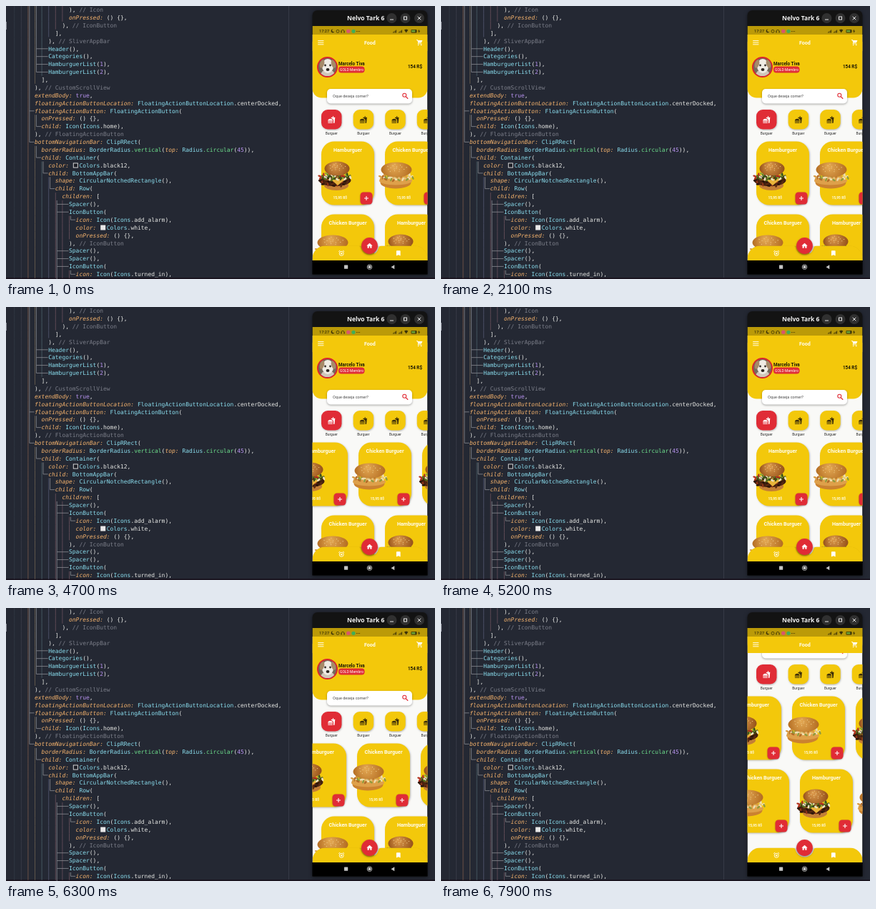
Recreate the animation shown at these times as an HTML page with a canvas. Size 600 by 382 pixels, loop 8000 ms.

```html
<!DOCTYPE html>
<html lang="en">
<head>
<meta charset="utf-8">
<title>Food app preview</title>
<style>
html, body { margin: 0; width: 100%; height: 100%; overflow: hidden; background: #242833; }
canvas { display: block; }
</style>
</head>
<body>
<canvas id="stage" width="600" height="382"></canvas>
<script>
const canvas = document.getElementById('stage');
let g = canvas.getContext('2d');

const LOOP = 8000, STEP = 100;
const YELLOW = '#f3c80b', RED = '#e02c36', PAPER = '#f9f9f7';
const LEFT = 428.5, WIDTH = 161;
const UI = 'Roboto, "Noto Sans", sans-serif';
const MONO = '"DejaVu Sans Mono", monospace';

// ---------- helpers ----------
function box(x, y, w, h, r, fill) {
  g.beginPath();
  g.roundRect(x, y, w, h, r);
  g.fillStyle = fill;
  g.fill();
}

function oval(x, y, rx, ry, fill, tilt = 0) {
  g.beginPath();
  g.ellipse(x, y, rx, ry, tilt, 0, Math.PI * 2);
  g.fillStyle = fill;
  g.fill();
}

function ring(x, y, r, color, width) {
  g.beginPath();
  g.arc(x, y, r, 0, Math.PI * 2);
  g.strokeStyle = color;
  g.lineWidth = width;
  g.stroke();
}

function line(color, width, ...pts) {
  g.beginPath();
  for (let i = 0; i < pts.length; i += 2) g.lineTo(pts[i], pts[i + 1]);
  g.strokeStyle = color;
  g.lineWidth = width;
  g.stroke();
}

function shape(color, ...pts) {
  g.beginPath();
  for (let i = 0; i < pts.length; i += 2) g.lineTo(pts[i], pts[i + 1]);
  g.fillStyle = color;
  g.fill();
}

function label(text, x, y, size, color, weight = 400, align = 'left') {
  g.font = `${weight} ${size}px ${UI}`;
  g.textAlign = align;
  g.fillStyle = color;
  g.fillText(text, x, y + size * 0.36);
}

function shadow(color, blur, dx, dy, draw) {
  g.save();
  g.shadowColor = color;
  g.shadowBlur = blur;
  g.shadowOffsetX = dx;
  g.shadowOffsetY = dy;
  draw();
  g.restore();
}

function at(x, y, draw) {
  g.save();
  g.translate(x, y);
  draw();
  g.restore();
}

const icons = {
  home: new Path2D('M10 20v-6h4v6h5v-8h3L12 3 2 12h3v8z'),
  cart: new Path2D('M7 18a2 2 0 100 4 2 2 0 000-4zM1 2v2h2l3.6 7.6L5.2 14C4.5 15.3 5.5 17 7 17h12v-2H7.4l1-2h7.2c.7 0 1.4-.4 1.7-1l3.6-6.5A1 1 0 0020 4H5.2l-.9-2zM17 18a2 2 0 100 4 2 2 0 000-4z'),
  mark: new Path2D('M17 3H7a2 2 0 00-2 2v16l7-3 7 3V5a2 2 0 00-2-2z'),
  meal: new Path2D('M18 23h1.7c.9 0 1.5-.6 1.6-1.5L23 5h-5V1h-2v4h-5l.3 2.4c4 1.1 6.7 3.6 6.700 7.600zM1 22v-1h15v1c0 .6-.4 1-1 1H2c-.6 0-1-.4-1-1zM16 15C16 7 1 7 1 15zM1 17h15v2H1z')
};

function icon(name, cx, cy, size, color) {
  at(cx - size / 2, cy - size / 2, () => {
    g.scale(size / 24, size / 24);
    g.fillStyle = color;
    g.fill(icons[name]);
  });
}

// ---------- editor ----------
const CHAR = 4.8, ROW = 10.88;
const source = [
  [10, '), // Icon'],
  [10, 'onPressed: () {},'],
  [8, '), // IconButton'],
  [6, '],'],
  [4, '), // SliverAppBar'],
  [4, 'Header(),'],
  [4, 'Categories(),'],
  [4, 'HamburguerList(1),'],
  [4, 'HamburguerList(2),'],
  [2, '],'],
  [0, '), // CustomScrollView'],
  [0, 'extendBody: true,'],
  [0, 'floatingActionButtonLocation: FloatingActionButtonLocation.centerDocked,'],
  [0, 'floatingActionButton: FloatingActionButton('],
  [2, 'onPressed: () {},'],
  [2, 'child: Icon(Icons.home),'],
  [0, '), // FloatingActionButton'],
  [0, 'bottomNavigationBar: ClipRRect('],
  [2, 'borderRadius: BorderRadius.vertical(top: Radius.circular(45)),'],
  [2, 'child: Container('],
  [4, 'color: □ Colors.black12,'],
  [4, 'child: BottomAppBar('],
  [6, 'shape: CircularNotchedRectangle(),'],
  [6, 'child: Row('],
  [8, 'children: ['],
  [10, 'Spacer(),'],
  [10, 'IconButton('],
  [12, 'icon: Icon(Icons.add_alarm),'],
  [12, 'color: ■ Colors.white,'],
  [12, 'onPressed: () {},'],
  [10, '), // IconButton'],
  [10, 'Spacer(),'],
  [10, 'Spacer(),'],
  [10, 'IconButton('],
  [12, 'icon: Icon(Icons.turned_in),']
];
// guide column, first row, rows with a branch
const tree = [
  [2, -1, [13, 17]], [3, -1, [5, 6, 7, 8]], [3, 14, [15]], [3, 18, [19]],
  [4, 20, [21]], [5, 22, [23]], [6, 25, [25, 26, 31, 32, 33, 35]],
  [8, 27, [27]], [8, 34, [34]]
];
const guideColors = ['#343a46', '#3d404d', '#7f5c4b', '#6d6151', '#50636d', '#555873', '#6b525d'];
const colX = col => 40 + col * CHAR;
const rowY = row => 5.4 + row * ROW;
const guideX = k => colX(2 * k - 6) + 0.5;
const treeX = k => colX(2 * k - 6) + CHAR / 2;

function tokenColor(token, next) {
  if (token.startsWith('//')) return '#7b7e89';
  if (/^\w+:$/.test(token)) return '#f5b36d';
  if (/^(true|\d+)$/.test(token)) return '#b893f0';
  if (token[0] === '.') return next && next[0] === '(' ? '#6ee08d' : '#e6e7e4';
  if (/^[A-Za-z]/.test(token)) return '#8bdff0';
  return '#e6e7e4';
}

function drawCode() {
  g.fillStyle = '#242833';
  g.fillRect(0, 0, 600, 382);
  line('#363a46', 1, 395.5, 0, 395.5, 380);
  g.fillStyle = '#1a1520';
  g.fillRect(0, 380, 600, 2);
  g.fillStyle = '#8a8c98';
  g.fillRect(0, 22, 1, 11);
  g.textAlign = 'left';
  source.forEach(([col, text], row) => {
    const y = rowY(row);
    for (let k = 0; k < col / 2 + 3; k++) {
      const color = guideColors[Math.min(k, guideColors.length - 1)];
      line(color, 0.8, guideX(k), y - ROW / 2, guideX(k), y + ROW / 2);
    }
    let x = colX(col);
    const tokens = text.match(/\/\/.*|\w+:|\.?\w+|[□■]|[^\w□■/.]+/g);
    tokens.forEach((token, i) => {
      if (token === '□' || token === '■') {
        box(x + 1, y - 3.5, 7, 7, 0, '#e8e8e8');
        if (token === '□') box(x + 1.9, y - 2.6, 5.2, 5.2, 0, '#1d1e26');
      } else {
        g.font = `${/^\w+:$/.test(token) ? 'italic ' : ''}7.97px ${MONO}`;
        g.fillStyle = tokenColor(token, tokens[i + 1]);
        g.fillText(token, x, y + 2.7);
      }
      x += token.length * CHAR;
    });
  });
  for (const [k, first, rows] of tree) {
    const x = treeX(k);
    line('#8b8c92', 0.8, x, rowY(first) - ROW / 2, x, rowY(rows[rows.length - 1]));
    for (const row of rows) {
      if (source[row]) line('#8b8c92', 0.8, x, rowY(row), colX(source[row][0]) - 0.5, rowY(row));
    }
  }
}

// ---------- food ----------
function bun(x, y, rx, ry, light, dark) {
  const tone = g.createRadialGradient(x - 4, y - 5, 1, x, y, rx);
  tone.addColorStop(0, light);
  tone.addColorStop(1, dark);
  oval(x, y, rx, ry, tone);
  for (let i = 0; i < 16; i++) {
    const a = i * 2.4, d = Math.sqrt(i / 16) * 0.75;
    oval(x + Math.cos(a) * d * rx, y - 2 + Math.sin(a) * d * ry * 0.75, 0.7, 0.5, '#f0d090', a);
  }
}

// Layer of small scattered pieces inside an oval.
function filling(x, y, rx, ry, count, colors) {
  for (let i = 0; i < count; i++) {
    const a = i * 2.4, d = Math.sqrt(i / count);
    oval(x + Math.cos(a) * d * rx, y + Math.sin(a) * d * ry, 2.6, 1.3, colors[i % colors.length], i);
  }
}

function beefBurger() {
  oval(29, 34, 17, 7, '#c47f36');
  oval(27, 27, 22.5, 8, '#43200f');
  filling(26, 29, 21, 6.5, 26, ['#5b2a12', '#2c150b', '#8c3418']);
  shape('#e9b43a', 14, 26, 46, 24, 37, 29, 31, 34, 24, 28);
  filling(27, 21.5, 23, 5, 44, ['#51731f', '#8fa43a', '#ece0c4', '#b5331f', '#39501a']);
  bun(30, 10.5, 17.5, 10, '#dc9a4c', '#945019');
}

function chickenBurger() {
  oval(26, 28.5, 21.5, 8.5, '#cb8230');
  oval(26, 26, 23, 6, '#dea04a');
  filling(27, 20.5, 24.5, 5.5, 44, ['#b26a28', '#e3c27a', '#8f9a3c', '#d89b45', '#f0dfb2']);
  bun(27, 10.5, 21.5, 10.5, '#e3a853', '#b36c22');
}

function card(x, y, chicken) {
  shadow('rgba(0,0,0,.25)', 2.5, 1, 1, () => box(x, y + 0.5, 74, 89, 18, YELLOW));
  label(chicken ? 'Chicken Burguer' : 'Hamburguer', x + 37, y + 12.5, 7.1, '#fffdf0', 700, 'center');
  if (chicken) at(x - 11, y + 29.5, chickenBurger);
  else at(x - 8, y + 28, beefBurger);
  label('15,95 R$', x + 16.5, y + 79.5, 4.9, '#fffbe0', 700);
  shadow('rgba(0,0,0,.3)', 2, 0, 0.8, () => box(x + 54.5, y + 71.5, 17, 17, 4.5, RED));
  line('#fff', 1.1, x + 60, y + 80, x + 66, y + 80);
  line('#fff', 1.1, x + 63, y + 77, x + 63, y + 83);
}

function cardRow(shift, y, startsWithChicken) {
  for (let i = 0; i < 4; i++) card(441 + i * 89 + shift, y, (i % 2 === 1) !== startsWithChicken);
}

// ---------- phone ----------
function drawWindow() {
  shadow('rgba(0,0,0,.5)', 5, 0, 1, () => box(LEFT, 6, WIDTH, 369.5, [7, 7, 0, 0], '#131313'));
  g.font = '700 8.5px "Noto Sans", sans-serif';
  g.textAlign = 'left';
  g.fillStyle = '#f2f2f2';
  g.fillText('Nelvo Tark 6', 477, 20);
  for (const x of [539.5, 558.5, 578]) oval(x, 17, 7, 7, '#303030');
  line('#e5e5e5', 1, 537, 19, 542, 19);
  g.strokeRect(556.5, 15, 4, 4);
  line('#e5e5e5', 1, 575.7, 14.7, 580.3, 19.3);
  line('#e5e5e5', 1, 575.7, 19.3, 580.3, 14.7);
}

function avatar() {
  oval(449.5, 85.5, 14.5, 14.5, '#d9262f');
  g.save();
  g.beginPath();
  g.arc(449.5, 85.5, 12.6, 0, Math.PI * 2);
  g.clip();
  g.fillStyle = '#756a5b';
  g.fillRect(436, 72, 28, 28);
  oval(450, 97, 10, 8, '#cfc7ba');
  oval(450, 84, 8, 10, '#efebe4');
  oval(442, 81, 3, 6, '#a68a69', 0.3);
  oval(458, 81, 3, 6, '#a68a69', -0.3);
  oval(446.5, 83, 1.3, 1.4, '#2c2622');
  oval(453.5, 83, 1.3, 1.4, '#2c2622');
  oval(450, 89, 2.4, 1.9, '#2c2622');
  g.restore();
}

function header() {
  box(LEFT, 50, WIDTH, 78.5, [0, 0, 13, 13], YELLOW);
  avatar();
  label('Marcelo Tiva', 465, 80.8, 6.3, '#1c1804', 700);
  box(465, 84.5, 36.5, 9, 4, RED);
  label('GOLD Membro', 467, 89, 5, '#fff');
  label('154 R$', 582, 85, 6.3, '#1c1804', 700, 'right');
  shadow('rgba(0,0,0,.35)', 3, 0, 1, () => box(449, 116, 119, 20.5, 5, '#fff'));
  label('Oque deseja comer?', 457, 126, 5.5, '#4a4a4a');
  ring(557.3, 124.8, 2.5, RED, 1.1);
  line(RED, 1.3, 559.1, 126.6, 562.2, 129.7);
}

function categories() {
  for (let i = 0; i < 4; i++) {
    const x = 441 + i * 44.6;
    shadow('rgba(0,0,0,.28)', 2.5, 0.5, 1, () => box(x, 145, 28.5, 27.5, 9, i ? YELLOW : RED));
    icon('meal', x + 14.25, 159, 11, i ? '#3a2c08' : '#fff');
    label('Burguer', x + 14.25, 178.5, 4.9, '#2b2b2b', 400, 'center');
  }
}

function statusBar() {
  g.fillStyle = '#bb9a08';
  g.fillRect(LEFT, 28, WIDTH, 12);
  const ink = '#3b3106';
  label('17:27', 438, 35.3, 5.6, ink, 500);
  oval(457, 35, 2.4, 2.4, ink);
  oval(458.2, 34.2, 2.1, 2.1, '#bb9a08');
  ring(464, 35.3, 2, ink, 0.8);
  g.beginPath();
  g.arc(471, 35.6, 2.2, Math.PI, 0);
  g.stroke();
  box(468.4, 35.3, 1.3, 2.2, 0.4, ink);
  box(472.4, 35.3, 1.3, 2.2, 0.4, ink);
  oval(478.8, 35.3, 2.7, 2.7, '#d8566c');
  oval(486, 35.3, 2.6, 2.6, '#3fae58');
  for (let i = 0; i < 3; i++) oval(490.5 + i * 2, 35.5, 0.6, 0.6, ink);
  for (const x of [541, 549]) {
    for (let i = 0; i < 4; i++) box(x + i * 1.4, 36.5 - i, 0.9, 1 + i, 0, ink);
  }
  shape(ink, 557, 33.5, 559.7, 32.6, 562.4, 33.5, 559.7, 37.5);
  box(566.5, 33, 8, 4.4, 1, ink);
  box(567.3, 33.8, 5, 2.8, 0.4, '#6ea535');
  shape(ink, 578, 32.5, 576, 35.5, 577.4, 35.5, 577, 38, 579.3, 34.8, 577.8, 34.8);
}

function appBar() {
  g.fillStyle = YELLOW;
  g.fillRect(LEFT, 40, WIDTH, 23);
  for (const y of [48.6, 51.2, 53.8]) line('#fffbe6', 1, 436.2, y, 444.4, y);
  label('Food', 501, 51.3, 7.1, '#fffdf0', 700);
  icon('cart', 578.7, 51.2, 9.8, '#fff');
}

function alarmIcon(x, y) {
  ring(x, y + 0.3, 3, '#fff', 0.9);
  line('#fff', 0.9, x - 1.5, y + 0.3, x + 1.5, y + 0.3);
  line('#fff', 0.9, x, y - 1.2, x, y + 1.8);
  line('#fff', 0.9, x - 4, y - 2.3, x - 2, y - 4);
  line('#fff', 0.9, x + 4, y - 2.3, x + 2, y - 4);
}

function bottomBar() {
  const top = 335.5, cx = 508.5, right = LEFT + WIDTH;
  g.save();
  g.beginPath();
  g.roundRect(LEFT, top, WIDTH, 20.5, [18, 18, 0, 0]);
  g.clip();
  g.fillStyle = 'rgba(0,0,0,.12)';
  g.fillRect(LEFT, top, WIDTH, 21);
  g.beginPath();
  g.moveTo(LEFT, top);
  g.lineTo(cx - 17, top);
  g.quadraticCurveTo(cx - 13.2, top, cx - 12.6, top + 3);
  g.arc(cx, top, 13, Math.PI - 0.24, 0.24, true);
  g.quadraticCurveTo(cx + 13.2, top, cx + 17, top);
  g.lineTo(right, top);
  g.lineTo(right, 357);
  g.lineTo(LEFT, 357);
  g.fillStyle = YELLOW;
  g.fill();
  g.restore();
  alarmIcon(469.2, 346);
  icon('mark', 548.8, 345.8, 9.8, '#fff');
  shadow('rgba(0,0,0,.4)', 3, 0, 1.2, () => oval(cx, 335.5, 11.4, 11.4, RED));
  icon('home', cx, 335.5, 10, '#fff');
}

function systemBar() {
  g.fillStyle = '#000';
  g.fillRect(LEFT, 356, WIDTH, 19.5);
  box(473, 362.6, 5.2, 5.2, 0.5, '#c4c4c4');
  ring(508.5, 365.2, 3.3, '#c4c4c4', 0.9);
  oval(508.5, 365.2, 2.1, 2.1, '#c4c4c4');
  shape('#c4c4c4', 538.5, 365.2, 543.3, 362.2, 543.3, 368.2);
}

// ---------- motion ----------
const topRow = [[3600, 0], [3900, -54], [4200, -70], [4700, -37], [5200, 0], [5700, 0], [6200, -39]];
const lowRow = [[7200, 0], [7800, -28]];
const page = [[6300, 0], [6800, -66]];

function value(keys, t) {
  if (t <= keys[0][0]) return keys[0][1];
  for (let i = 1; i < keys.length; i++) {
    const [t0, a] = keys[i - 1], [t1, b] = keys[i];
    if (t <= t1) {
      const p = (t - t0) / (t1 - t0);
      return a + (b - a) * p * p * (3 - 2 * p);
    }
  }
  return keys[keys.length - 1][1];
}

function drawPhone(t) {
  g.save();
  g.beginPath();
  g.rect(LEFT, 28, WIDTH, 328);
  g.clip();
  g.fillStyle = PAPER;
  g.fillRect(LEFT, 40, WIDTH, 316);
  at(0, value(page, t), () => {
    header();
    categories();
    cardRow(value(topRow, t), 189, false);
    cardRow(value(lowRow, t), 291, true);
  });
  appBar();
  statusBar();
  bottomBar();
  g.restore();
}

// The editor and window frame never change, so paint them once.
const backdrop = document.createElement('canvas');
backdrop.width = 600;
backdrop.height = 382;
const stage = g;
g = backdrop.getContext('2d');
drawCode();
drawWindow();
systemBar();
g = stage;

const start = performance.now();
function frame() {
  const t = (performance.now() - start) % LOOP;
  g.drawImage(backdrop, 0, 0);
  drawPhone(Math.floor(t / STEP) * STEP);
  requestAnimationFrame(frame);
}
frame();
</script>
</body>
</html>
```
